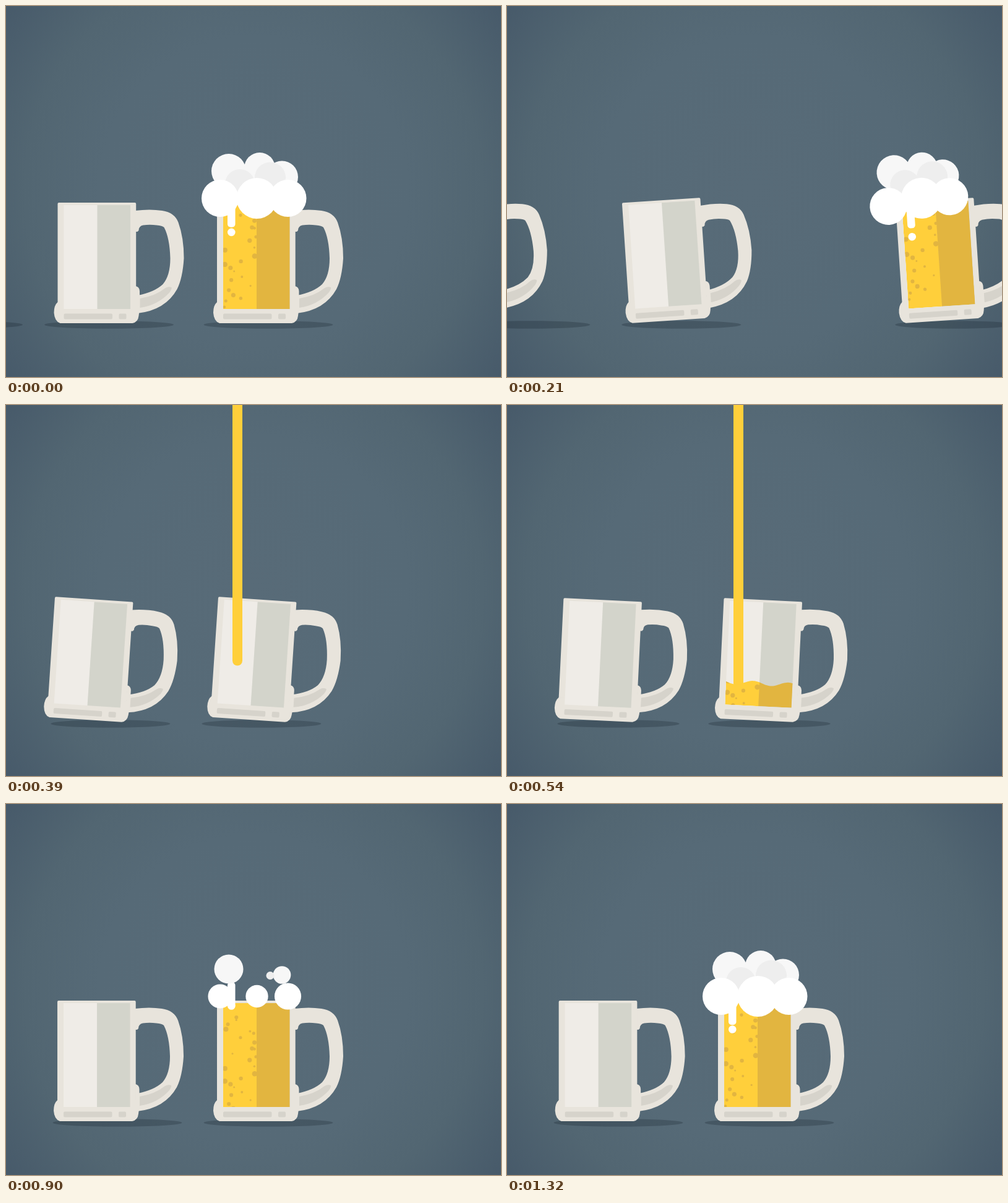
Animation, 800 px wide and 600 px high, one loop 1.35 s. Source, as an HTML page with a canvas:

```html
<!DOCTYPE html>
<html lang="en">
<head>
<meta charset="utf-8">
<title>Beer mugs</title>
<style>
html, body { margin: 0; width: 100%; height: 100%; overflow: hidden; background: #566a77; }
canvas { display: block; width: 800px; height: 600px; }
</style>
</head>
<body>
<canvas id="stage" width="800" height="600"></canvas>
<script>
const ctx = document.getElementById('stage').getContext('2d');
const LOOP = 1350, STEP = 30, TRAVEL = 257.5;
const GLASS = '#e8e4dc', TRIM = '#d6d3cb', BEER = '#ffcf3b', AMBER = '#e2b540';
const POUR = 413, FILL = 408, FLOOR = 490, BRIM = 322, STREAM_SPEED = 2.98;

const clamp = (v, lo = 0, hi = 1) => Math.min(hi, Math.max(lo, v));
const ease = u => (1 - Math.cos(Math.PI * clamp(u))) / 2;

// Motion rules, all in ms since the start of the loop
const slide = t => TRAVEL * ease(t / 450);
const lead = t => 240 * (1 - Math.exp(-((t / 167) ** 1.66)));
const gap = t => 257.3 + 30 * Math.exp((270 - t) / 69) + 2 * (1 - t / LOOP);
const tilt = t => -4.7 * Math.sin(2 * Math.PI * clamp(t / 600));
const level = t => FLOOR - (FLOOR - BRIM) * ease((t - POUR) / FILL);
const drip = t => 330.5 + 23 * (1 - Math.exp((900 - t) / 130)) + .011 * (t - 900);
const drop = t => drip(t) - 4 + .027 * (t - 900);

// x, y, radius, start of growth, sag
const whiteBack = [[360, 267, 28, 780], [410, 262, 25, 905], [446, 276.5, 26, 834]];
const greyBack = [[378, 288, 24, 900], [427, 277.5, 25, 872]];
const front = [[346, 311, 30, 818, .7], [455.5, 311, 30, 806], [405.5, 311, 33, 834]];

let seed = 11;
const random = () => (seed = seed * 16807 % 2147483647) / 2147483647;
const bubbles = Array.from({ length: 28 }, (_, i) => ({
  x: 353 + 51 * random(),
  height: -22 + 172 * (i + random()) / 28,
  r: 1.5 + 3.2 * random() ** 1.3
}));

function box(x0, y0, x1, y1, color, r = 0) {
  ctx.fillStyle = color;
  ctx.beginPath();
  ctx.roundRect(x0, y0, x1 - x0, y1 - y0, r);
  ctx.fill();
}

function disc(x, y, r, color) {
  ctx.fillStyle = color;
  ctx.beginPath();
  ctx.arc(x, y, r, 0, 2 * Math.PI);
  ctx.fill();
}

function shape(path, color) {
  ctx.fillStyle = color;
  ctx.fill(path);
}

const handle = new Path2D('M466 331 Q490 328 510 331 Q530 334 536 350 Q545 375 545 408 ' +
  'Q543 440 534 458 Q515 492 470 497 V468 Q497 463 511 450 Q523 436 523 408 ' +
  'Q522 375 513 358 Q510 355 501 354.5 Q490 353 479 354.5 Q472 356 472 363 L470 365 H466 Z');
const handleShade = new Path2D('M474 473 Q499 469 515 456 Q520 453 525 455 Q526 457 522 463 Q503 484 474 488 Z');
const base = new Path2D('M341 479 Q335 484 335 496 Q336 510 345 513 H462 Q471 511 472 501 ' +
  'L473.5 489 V461 Q473 454 467 453 V479 Z');

function background() {
  const g = ctx.createRadialGradient(400, 300, 0, 400, 300, 500);
  g.addColorStop(0, '#586b78');
  g.addColorStop(.5, '#566a77');
  g.addColorStop(.74, '#526672');
  g.addColorStop(1, '#475a6a');
  ctx.fillStyle = g;
  ctx.fillRect(0, 0, 800, 600);
}

function shadow(offset, angle) {
  ctx.fillStyle = 'rgba(0, 10, 20, .2)';
  ctx.beginPath();
  ctx.ellipse(424 + offset, 515.5, 104.5 - 2.1 * Math.abs(angle), 6.3, 0, 0, 2 * Math.PI);
  ctx.fill();
}

function glass() {
  shape(handle, GLASS);
  shape(handleShade, TRIM);
  box(341, 318, 467.7, 495, GLASS, 2);
  shape(base, GLASS);
  box(351, BRIM, 405.5, FLOOR, '#efece7');
  box(405, BRIM, 458.5, FLOOR, '#d3d4cb');
  box(351, 497.5, 429.5, 506.5, TRIM, 2);
  box(440, 497.5, 452, 506.5, TRIM, 2);
}

function beer(t) {
  if (t < POUR) return;
  const wave = 3.5 * clamp((960 - t) / 270) * clamp((t - POUR) / 60);
  ctx.save();
  ctx.beginPath();
  ctx.rect(351, BRIM, 107.5, FLOOR - BRIM);
  ctx.clip();
  ctx.beginPath();
  ctx.moveTo(351, FLOOR);
  for (let x = 351; x <= 459; x += 2)
    ctx.lineTo(x, level(t) - wave * Math.cos((x - 356 - (t - 690) * .12) * 2 * Math.PI / 57));
  ctx.lineTo(459, FLOOR);
  ctx.clip();
  box(351, 318, 405.5, FLOOR, BEER);
  box(405, 318, 459, FLOOR, AMBER);
  // Bubbles speed up as they rise
  const growth = Math.exp(.00027 * (t - 900));
  for (const { x, height, r } of bubbles)
    disc(x, FLOOR + 193 - (height + 193) * growth, r, AMBER);
  ctx.restore();
}

// Foam swells, then trails behind the departing mug
function foam(balls, color, t) {
  const trail = Math.sin(Math.PI * clamp((t - LOOP) / 540)) ** 2;
  for (const [x, y, r, start, sag = .1] of balls) {
    const lag = trail * (19 + .1 * (x - 346));
    const size = 1 - (1 - clamp((t - start) / 200)) ** 2;
    disc(x - lag, y + lag * sag, r * size, color);
  }
}

function head(t) {
  if (t > 840) {
    box(358, Math.min(288, drip(t)), 370.5, drip(t), '#fff', 5);
    disc(364.3, drop(t), 6.3, '#fff');
  }
  foam(whiteBack, '#f7f7f7', t);
  foam(greyBack, '#eee', t);
  foam(front, '#fff', t);
}

function stream(t) {
  const tail = Math.max(-20, 148 + STREAM_SPEED * (t - 690));
  const tip = Math.min(64 + STREAM_SPEED * (t - 270), level(t) + 5);
  if (tip > 0 && tip > tail) box(366, tail, 382, tip, BEER, 8);
}

function posed(offset, angle, paint) {
  const pivot = angle > 0 ? 465 : 341;
  ctx.save();
  ctx.translate(pivot + offset, 513);
  ctx.rotate(angle * Math.PI / 180);
  ctx.translate(-pivot, -513);
  paint();
  ctx.restore();
}

function draw(t) {
  const angle = tilt(t), current = slide(t) - TRAVEL, leaving = slide(t) + lead(t);
  background();
  shadow(current, angle);
  shadow(current - 244, angle);
  posed(current - gap(t), angle, glass);
  posed(current, angle, glass);
  stream(t);
  posed(current, angle, () => { beer(t); head(t); });
  if (t < 600) {
    shadow(leaving, angle);
    posed(leaving, angle, () => { glass(); beer(t + LOOP); head(t + LOOP); });
  }
}

function tick() {
  draw(Math.floor(performance.now() % LOOP / STEP) * STEP);
  requestAnimationFrame(tick);
}
tick();
</script>
</body>
</html>
```
